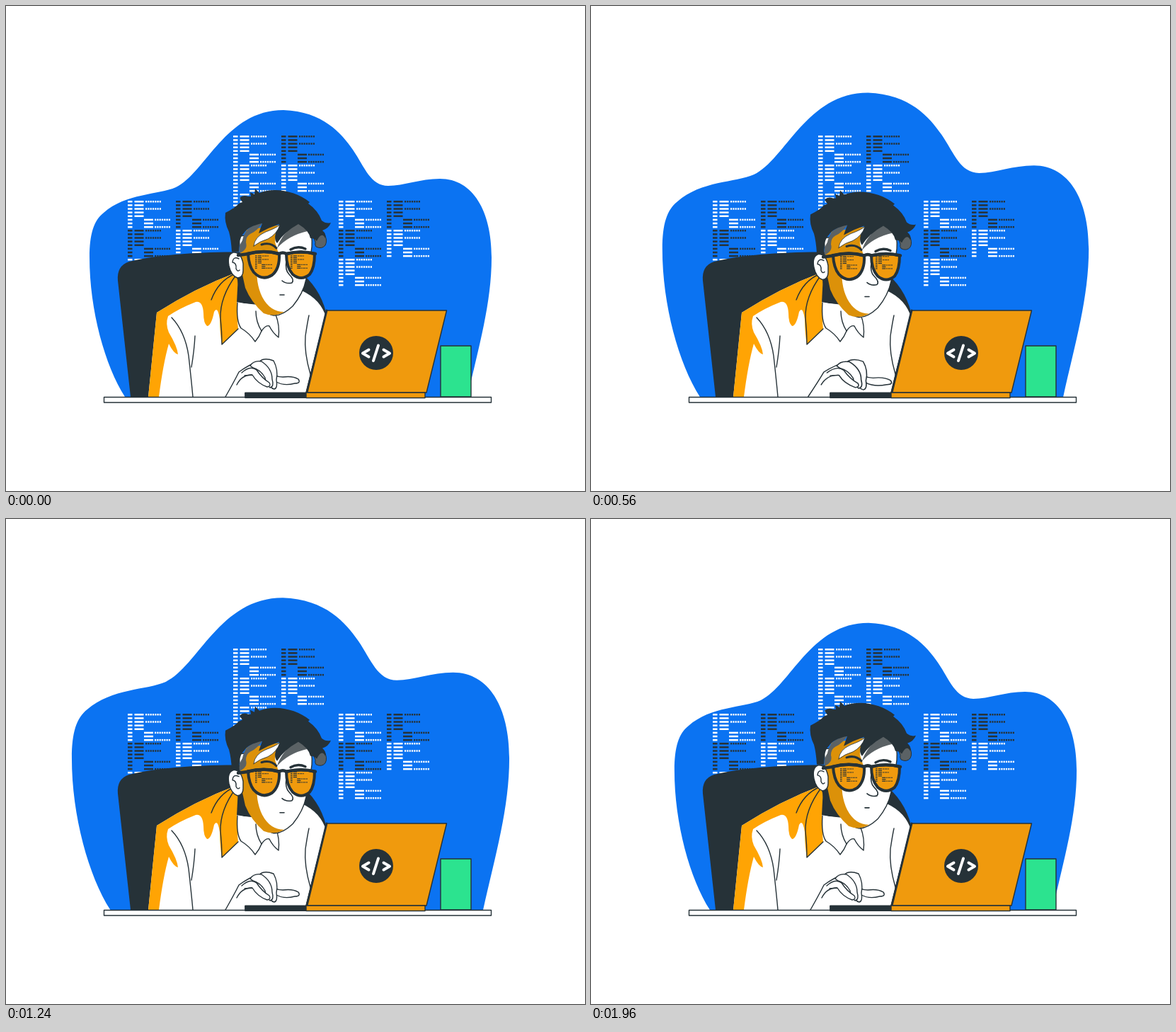
An HTML page with a canvas for the animation above (2000 ms loop, 818x685 px).

```html
<!DOCTYPE html>
<html lang="en">
<head>
<meta charset="utf-8">
<title>Coder at work</title>
<style>
html, body { margin: 0; width: 100%; height: 100%; overflow: hidden; background: #fff; }
canvas { display: block; }
</style>
</head>
<body>
<canvas id="stage" width="818" height="685"></canvas>
<script>
const ctx = document.getElementById('stage').getContext('2d');
const LOOP = 2000, STEP = 40;
const BLUE = '#0b73f2', DARK = '#263238', AMBER = '#ffa404', SHADE = '#dc9109',
      LAPTOP = '#f09a0d', GRAY = '#5b6265', GREEN = '#2ce38f', WHITE = '#fff';

const BLOB = 'M168 552C140 508 118 430 118 355C118 322 124 303 138 292C170 264 215 267 240 256' +
  'C282 236 310 147 392 147C448 149 474 180 490 203C507 228 515 254 540 254' +
  'C562 254 585 244 613 244C660 244 686 290 686 355C686 420 668 480 652 552Z';
const LENSES = [
  'M342 350Q364 344 386 350Q387 371 376 380Q362 389 350 376Q343 367 342 350Z',
  'M396 350Q417 345 436 350Q436 370 429 379Q417 389 405 379Q396 369 396 350Z'
];

function shape(d, fill, line, width = 1.4) {
  const p = new Path2D(d);
  if (fill) { ctx.fillStyle = fill; ctx.fill(p); }
  if (line) { ctx.strokeStyle = line; ctx.lineWidth = width; ctx.stroke(p); }
}
const stroke = (d, width, color = DARK) => shape(d, null, color, width);

function placed(move, draw) {
  ctx.save();
  move();
  draw();
  ctx.restore();
}

const ease = u => u < .5 ? 2 * u * u : 1 - 2 * (1 - u) * (1 - u);

// Evenly spaced keys across the loop, eased between neighbours
function keyed(values, t) {
  const pos = t / LOOP * (values.length - 1), i = Math.floor(pos);
  return values[i] + (values[i + 1] - values[i]) * ease(pos - i);
}

function codeBlock(x, y, color) {
  ctx.fillStyle = color;
  for (let r = 0; r < 8; r++) {
    const top = y + r * 5.13 - 1.2, low = r > 4;
    const bar = (dx, w) => ctx.fillRect(x + dx, top, w, 2.5);
    bar(0, 6.5);
    if (low) bar(23, 13);
    else bar(9.5, 13);
    if (r === 0 || r === 2 || r === 5 || r === 7)
      for (let i = 0; i < 7; i++) bar((low ? 38 : 25) + i * 3.3, 2.2);
  }
}

function codeGroup(x, y, thirdDark) {
  codeBlock(x, y, WHITE);
  codeBlock(x + 68, y, DARK);
  codeBlock(x, y + 41, thirdDark ? DARK : WHITE);
  codeBlock(x + 68, y + 41, WHITE);
  codeBlock(x, y + 82, WHITE);
}

function drawBack(t) {
  const s = 1 + .051 * (1 - Math.cos(Math.PI * 2 * t / LOOP));
  placed(() => {
    ctx.translate(402, 552);
    ctx.scale(s, s);
    ctx.translate(-402, -552);
  }, () => shape(BLOB, BLUE));
  codeGroup(321, 184.2, false);
  codeGroup(172, 276.2, true);
  codeGroup(470, 276.2, true);
}

function drawBody() {
  shape('M176 552L158 388Q156 367 174 361C210 352 270 347 330 347.5C400 350 440 386 452 432L440 470L220 552Z', DARK);
  shape('M201 552L213 433Q268 398 324 377L330 405L352 420L410 398Q441 409 451 434L430 520L424 552Z', WHITE);
  // shaded shoulder with drips
  shape('M201 552L213 433Q268 398 324 377Q331 395 328 422Q326 440 328 456L305 478Q302 462 302 442' +
    'Q299 423 294 432Q290 452 284 452Q279 448 279 434Q278 416 268 418Q245 427 229 438' +
    'Q225 449 230 461Q242 481 243 492Q237 491 230 477Q222 505 216 552Z', AMBER);
  shape('M328 380L326 419Q345 421 379 424L372 390Z', DARK);
  shape('M326 418Q347 423 379 424L384 438L385 468L361 459L352 474L330 454Z', WHITE);
  stroke('M324 378Q300 388 290 415');
  stroke('M325 380Q302 411 303 441Q305 460 305 478L328 456');
  stroke('M327 419Q325 445 332 455Q344 462 352 474Q358 467 361 459Q353 446 353 431');
  stroke('M361 459Q367 450 372 452Q377 462 385 468Q387 451 381 436');
  stroke('M234 440Q253 460 258 494Q262 530 264 552');
  stroke('M267 466Q266 486 262 510');
  stroke('M430 520Q421 489 423 466Q426 446 428 437');
  stroke('M410 398Q441 409 451 434');
}

function drawHair() {
  shape('M330 349Q328 340 334 331Q337 315 350 310L364 304Q355 318 345 322Q339 325 339 334Q342 344 330 349Z', GRAY);
  shape('M383 342Q389 322 413 304L426 318Q399 324 383 342Z', GRAY);
  shape('M433 322Q441 316 449 320Q455 331 451 338Q446 344 438 340Q436 337 437 334Z', GRAY, DARK, 1);
  shape('M319 347Q318 330 315 319Q308 305 310 292Q324 285 329 279L334 277L330 271Q335 266 342 269L346 269' +
    'L345 263L351 266L352 258L358 264C380 255 411 262 429 277L427 279Q441 289 446 303Q452 308 459 306' +
    'Q456 314 447 317Q453 322 451 328Q446 318 439 332Q436 328 430 328Q428 317 413 308' +
    'Q393 319 383 335Q376 328 386 308Q371 313 357 321L362 307Q342 311 336 321Q329 327 329 347Z', DARK);
}

function drawGlasses(lift) {
  for (const d of LENSES) shape(d, LAPTOP);
  placed(() => {
    const clip = new Path2D();
    LENSES.forEach(d => clip.addPath(new Path2D(d)));
    ctx.clip(clip);
    // the reflection barely follows the nod
    ctx.translate(0, -.75 * lift);
  }, () => {
    for (const x of [352, 402]) placed(() => {
      ctx.translate(x, 353);
      ctx.scale(.4, .48);
    }, () => codeBlock(0, 0, DARK));
  });
  for (const d of LENSES) stroke(d, 4);
  stroke('M328 352L343 350', 4.5);
  stroke('M341 350Q365 344 386 350Q391 347 396 350Q417 345 437 350', 4.5);
}

function drawHead(lift) {
  const face = 'M329 325L430 315Q434 333 431 348Q425 365 424 386Q420 406 405 424Q390 438 378 437' +
    'Q363 434 347 411Q336 395 333 374Z';
  shape(face, WHITE, DARK);
  shape('M331 340L340 316L389 309Q376 329 382 339L385 350L355 362Q352 391 362 411Q373 432 393 432' +
    'Q379 440 364 434Q346 418 338 398L333 375Z', SHADE);
  drawHair();
  shape('M350 339Q351 326 367 319Q381 314 387 309Q383 322 370 329Q359 332 350 339Z', WHITE, DARK, .8);
  shape('M335 364Q332 347 321 348Q312 351 315 367Q318 381 327 384Q335 383 335 374Z', WHITE, DARK);
  stroke('M329 357Q321 353 320 362Q326 363 325 371Q327 376 330 373');
  stroke('M361 337Q374 333 382 342', 3);
  stroke('M402 344Q412 338 423 343', 3.4);
  stroke('M396 360Q394 373 400 379Q408 387 404 391Q396 393 390 388', 1.6);
  stroke('M387 408L393 408', 1.6);
  drawGlasses(lift);
}

function drawHand(reach) {
  placed(() => {
    ctx.translate(330, 520);
    ctx.rotate(.02 * reach);
    ctx.scale(1 + .13 * reach, 1);
    ctx.translate(-330, -520);
  }, () => {
    shape('M310 552Q322 531 329 517Q345 506 358 501L381 518L365 537Q350 516 335 525L326 546Z', WHITE);
    stroke('M310 552Q322 531 329 517Q344 506 357 502');
    shape('M365 512Q378 524 391 524Q405 522 413 527Q417 533 408 533Q393 537 382 531Z', WHITE, DARK);
    shape('M358 502Q365 496 378 501Q385 514 382 528Q384 540 379 541Q372 540 373 529Q375 516 366 510Z', WHITE, DARK);
    shape('M345 508Q350 500 361 502Q376 512 376 527Q379 538 373 539Q367 535 366 525Q360 514 349 511Z', WHITE, DARK);
    shape('M333 518Q345 507 354 514Q362 526 372 532Q375 537 369 538Q355 533 348 521L337 522', WHITE, DARK);
    stroke('M326 535Q333 521 347 521');
  });
}

function drawDesk() {
  shape('M614 480H657V552H614Z', GREEN, DARK);
  shape('M453 430H622.5L594 546H424Z', LAPTOP, DARK);
  stroke('M453 430L425 546', 3);
  ctx.fillStyle = DARK;
  ctx.beginPath();
  ctx.arc(523, 490, 24, 0, Math.PI * 2);
  ctx.fill();
  stroke('M512.5 485.5L504 490.5L512.5 495.5M526 479.5L519 501M533.5 485.5L542 490.5L533.5 495.5', 4, WHITE);
  shape('M138.5 552.5H685.5V560H138.5Z', WHITE, DARK);
  shape('M338 546H424V553.5H338Z', DARK, DARK, 1);
  shape('M424 546H592V553.5H424Z', LAPTOP, DARK);
}

function draw(t) {
  const lift = keyed([0, 7, -7, 7, -7, 0], t);
  const reach = keyed([0, 1, 0, 0, 0], t);
  ctx.fillStyle = WHITE;
  ctx.fillRect(0, 0, 818, 685);
  ctx.lineJoin = ctx.lineCap = 'round';
  drawBack(t);
  drawBody();
  placed(() => ctx.translate(0, lift), () => drawHead(lift));
  drawHand(reach);
  drawDesk();
}

const start = performance.now();
function tick() {
  const t = (performance.now() - start) % LOOP;
  draw(Math.floor(t / STEP) * STEP);
  requestAnimationFrame(tick);
}
tick();
</script>
</body>
</html>
```
